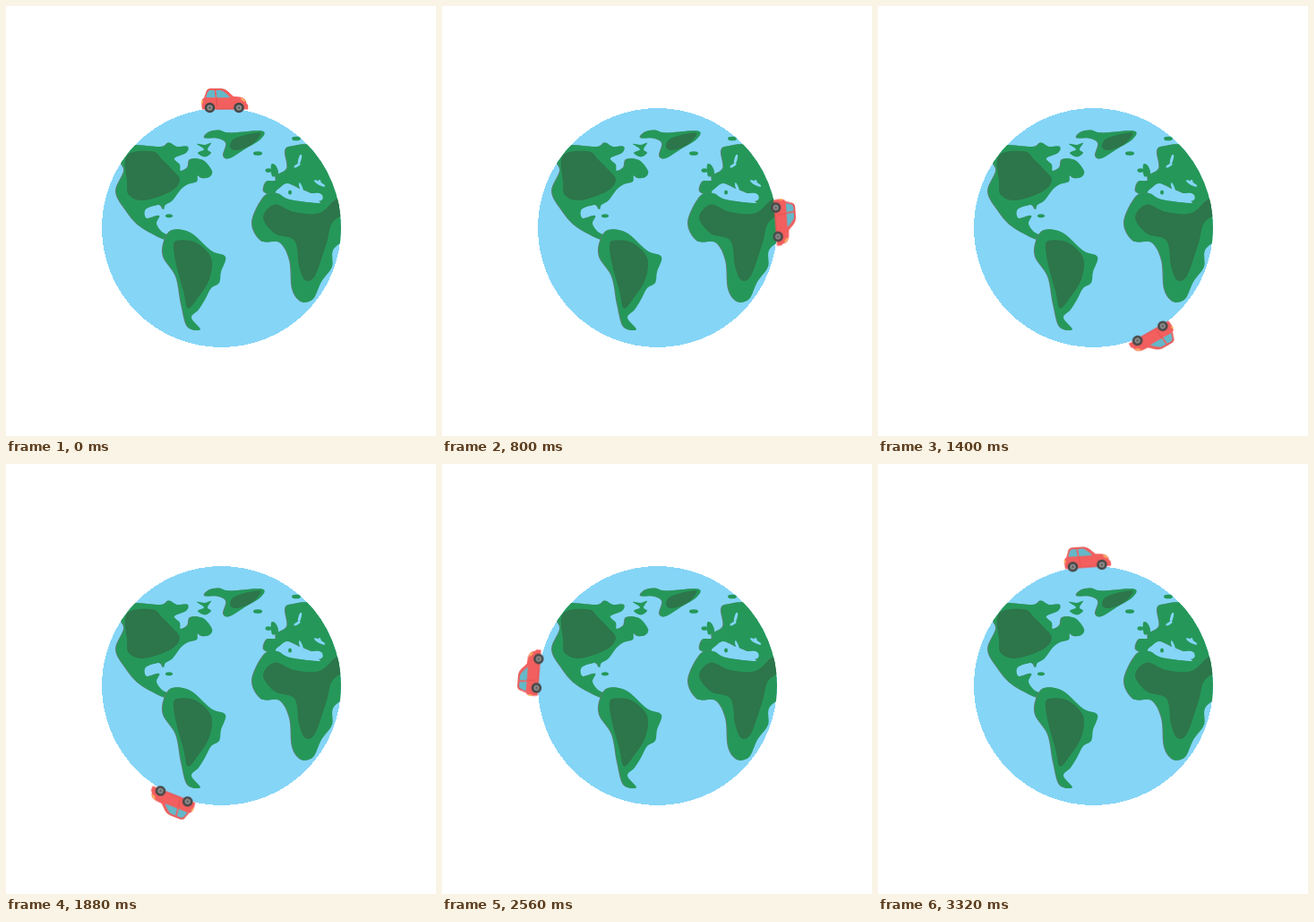
Recreate the animation shown at these times as an HTML page. Size 480 by 480 pixels, loop 3.36 s.

```html
<!DOCTYPE html>
<html lang="en">
<head>
<meta charset="utf-8">
<title>Car around the globe</title>
<style>
  html, body { margin: 0; width: 100%; height: 100%; overflow: hidden; background: #fff; }
  svg { display: block; width: 100vw; height: 100vh; }
  .sea { fill: #85d5f7; }
  .land { fill: #259859; filter: drop-shadow(-.7px .7px 0 #5c7f70); }
  .isle { fill: #259859; }
  .inner { fill: #2d754b; }
  .body { fill: #f25f5e; }
  .trim { fill: none; stroke: #e4504f; stroke-width: .9; }
  .glass { fill: #64b8c8; }
  .lamp { fill: #f9b35d; }
  #car {
    transform-origin: 240px 247.5px;
    /* small lead keeps each step clear of its boundary */
    animation: orbit 3360ms steps(84) -2ms infinite;
  }
  @keyframes orbit { to { transform: rotate(360deg); } }
</style>
</head>
<body>
<svg viewBox="0 0 480 480">
  <defs>
    <clipPath id="disc"><circle cx="240.5" cy="247.5" r="133.5"/></clipPath>
    <g id="wheel">
      <circle r="5.8" fill="#474747"/>
      <circle r="3.1" fill="#949494"/>
      <circle r="1.5" fill="#62605f"/>
    </g>
  </defs>
  <circle class="sea" cx="240.5" cy="247.5" r="133.5" shape-rendering="crispEdges"/>
  <g id="map" clip-path="url(#disc)"></g>
  <g id="car">
    <path class="body" d="M219 115.500Q217 104 221 102.500L223.500 95.500Q224.600 92.200 228 92.200H240Q245 92.300 249.500 97L254 101Q268 100.500 268.300 108.500L270.200 110.500V115.500Z"/>
    <path class="glass" d="M223.300 102Q225 94.100 228 94.100H232.600L233.800 102.200ZM234.400 94.100H239.500Q243 94.300 250.200 102.200H235.400Z"/>
    <path class="trim" d="M224 95.500Q225 92.700 228 92.700H240Q245 92.800 249.500 97.500M235 102.500L236 112M234 114.800H254"/>
    <path class="lamp" d="M261.500 102.300Q266 102.800 267.500 107Q263 106.500 261.500 102.300ZM218.200 105.500H220V108.500H218Z"/>
    <use href="#wheel" x="227.5" y="113.5"/>
    <use href="#wheel" x="260" y="113.5"/>
  </g>
</svg>
<script>
const map = document.getElementById('map');

function add(tag, attrs) {
  const el = document.createElementNS('http://www.w3.org/2000/svg', tag);
  for (const key in attrs) el.setAttribute(key, attrs[key]);
  map.append(el);
}

// Closed Catmull-Rom curve through a few key points "x,y x,y ..."
function shape(kind, text) {
  const p = text.trim().split(/\s+/).map(s => s.split(',').map(Number));
  const at = i => p[(i + p.length) % p.length];
  const handle = (from, a, b) => from.map((v, k) => v + (b[k] - a[k]) / 6);
  const d = p.map((b, i) => {
    const c = at(i + 1);
    return `C${handle(b, at(i - 1), c)} ${handle(c, at(i + 2), b)} ${c}`;
  });
  add('path', { class: kind, d: `M${p[0]}${d.join('')}` });
}

function blob(kind, cx, cy, rx, ry, turn = 0) {
  add('ellipse', { class: kind, cx, cy, rx, ry, transform: `rotate(${turn} ${cx} ${cy})` });
}

// North and Central America
shape('land', `128,172 138,156 173,157 182,152.5 191,157 203,157 201,164 188,170
  194,177 195,184 203,180 206,171 220,172 230,184 227,191 219,192 214,189 213,196
  203,199 195,205 186,217 178,222 176,227 171,222 156,227 157,237 171,234 168,243
  174,252 183,257 178,261 150,246 134,228 123,207 132,184`);
shape('inner', `133,172 142,163 165,162.5 174,171 184,181 194,194 184,207
  154,217 137,211 135,195`);

// Greenland and the northern islands
shape('land', `222,147 227,140.5 238,138.5 250,141.5 286,139.5 284,149 267,159.5
  250,170 243,167 246,153 236,147.5`);
shape('inner', '250,156 257,147 284,141.5 274,155 256,161');
blob('isle', 281, 164.5, 5, 2.3);
blob('isle', 324, 148, 5, 2.3);
shape('isle', '213,154 222,155 229,153 225,160 229,164 222,168.5 214,164 221,160');
blob('isle', 182, 234.3, 4, 2);

// South America
shape('land', `177,262 186,250 206,253 229,273 245,280 240,297 238,309 229,315
  222,328 215,339 207,348 217,361 203,358 196,333 190,302 176,280`);
shape('inner', `187,267 193,261.5 212,264 229,281 227,305 214,326 203,337.5
  198,318 190,289`);

// Europe and western Asia
shape('land', `312,162 319,156.5 345,157 380,190 380,230 355,222 345,211 329,204
  313,198 299,209 288,207 291,196 301,195 302,189 314,181`);
blob('isle', 293, 183.5, 3.5, 2.3);
shape('isle', '296,177 301,178 304,187 297,190');

// Africa
shape('land', `275,241 288,213 302,208.5 317,216 354,220 385,215 390,250 366,271
  364,291 352,308 343,327 330,330 320,316 317,284 306,264 285,262`);
shape('inner', `287,236 300,221.5 322,230 350,231 372,214 388,225 365,241
  358,264 345,301 334,306 327,290 322,262 300,254`);

// Inland seas
shape('sea', '301,208 309,201 317,199 326,209 350,209 352,217 333,217 314,211');
blob('isle', 317, 208, 2, 2.5);
blob('sea', 329.5, 203, 1.6, 6, -20);
blob('sea', 350, 198, 7, 1.8, 30);
blob('sea', 350, 197, 1.5, 3);
blob('sea', 328, 171, 1.6, 5.5, 15);
blob('sea', 325, 178, 4, 1.5, -30);
</script>
</body>
</html>
```
